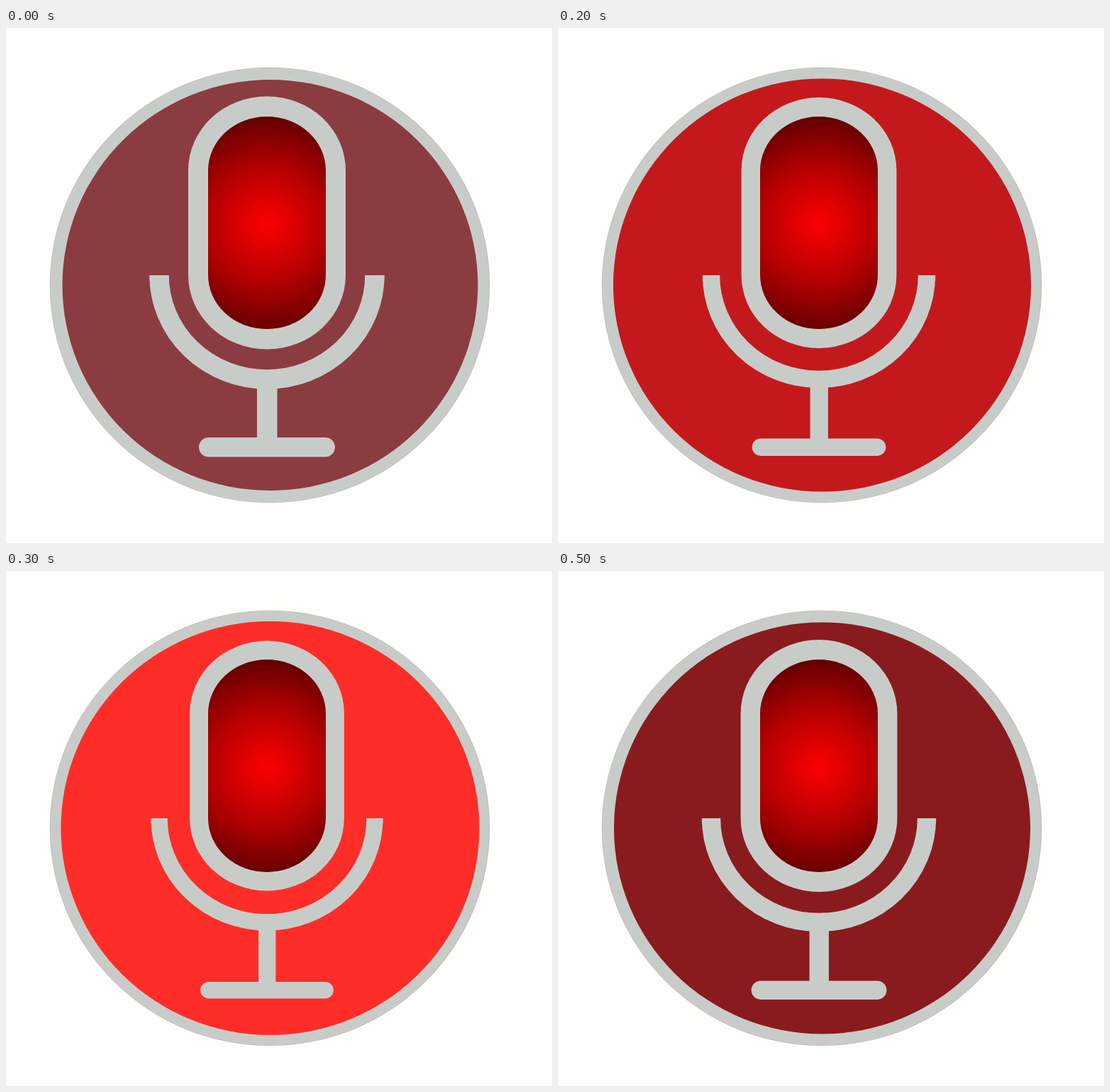
These frames come from a looping animation (770 px wide and 727 px high, 600 ms). An HTML page with a canvas:

```html
<!DOCTYPE html>
<html lang="en">
<head>
<meta charset="utf-8">
<title>Recording</title>
<style>
html, body { margin: 0; width: 100%; height: 100%; overflow: hidden; background: #fefefd; }
canvas { display: block; }
</style>
</head>
<body>
<canvas id="stage" width="770" height="727"></canvas>
<script>
const ctx = document.getElementById('stage').getContext('2d');
const GREY = '#c8ccc9';
const STEP = 100;
const CX = 368, TOP = 201, BOTTOM = 349;

// Disc colour and how far it eats into the grey shapes.
const dim = { color: '#8b3c40', inset: 0 };
const dark = { color: '#891b1e', inset: 0.6 };
const mid = { color: '#c3191d', inset: 1.6 };
const bright = { color: '#ff2d28', inset: 2.1 };
const pulse = [dim, dark, mid, bright, mid, dark];

const glow = ctx.createRadialGradient(CX, 277, 0, CX, 277, 160);
glow.addColorStop(0, '#f80000');
glow.addColorStop(0.1, '#f00000');
glow.addColorStop(0.52, '#b20000');
glow.addColorStop(1, '#5a0000');

function ellipse(x, y, rx, ry, fill) {
  ctx.beginPath();
  ctx.ellipse(x, y, rx, ry, 0, 0, Math.PI * 2);
  ctx.fillStyle = fill;
  ctx.fill();
}

// Upright pill with elliptical ends.
function pill(rx, ry, fill) {
  ctx.beginPath();
  ctx.ellipse(CX, TOP, rx, ry, 0, Math.PI, 0);
  ctx.ellipse(CX, BOTTOM, rx, ry, 0, 0, Math.PI);
  ctx.closePath();
  ctx.fillStyle = fill;
  ctx.fill();
}

function drawStand(d) {
  ctx.strokeStyle = GREY;
  ctx.lineWidth = 27.5 - 2 * d;
  ctx.lineCap = 'round';
  ctx.beginPath();
  ctx.moveTo(CX + 152, 355);
  ctx.ellipse(CX, BOTTOM, 152, 147, 0, 0, Math.PI);
  ctx.lineTo(CX - 152, 355);
  ctx.stroke();

  ctx.fillStyle = GREY;
  ctx.fillRect(354 + d, 496, 28.5 - 2 * d, 90);
  ctx.beginPath();
  ctx.roundRect(272 + d, 578 + d, 192 - 2 * d, 27.5 - 2 * d, 13.75 - d);
  ctx.fill();
}

function draw({ color, inset: d }) {
  ctx.fillStyle = '#fefefd';
  ctx.fillRect(0, 0, 770, 727);

  ellipse(372, 363, 310, 307, GREY);
  ctx.strokeStyle = 'rgba(140, 90, 95, 0.3)';
  ctx.lineWidth = 0.8;
  ctx.stroke();
  ellipse(372.5, 363, 293 + d, 290 + d, color);

  drawStand(d);
  pill(111 - d, 104.5 - d, GREY);
  pill(83, 76, glow);
}

const start = performance.now();
function tick() {
  const t = Math.max(0, performance.now() - start);
  draw(pulse[Math.floor(t / STEP) % pulse.length]);
  requestAnimationFrame(tick);
}
tick();
</script>
</body>
</html>
```
